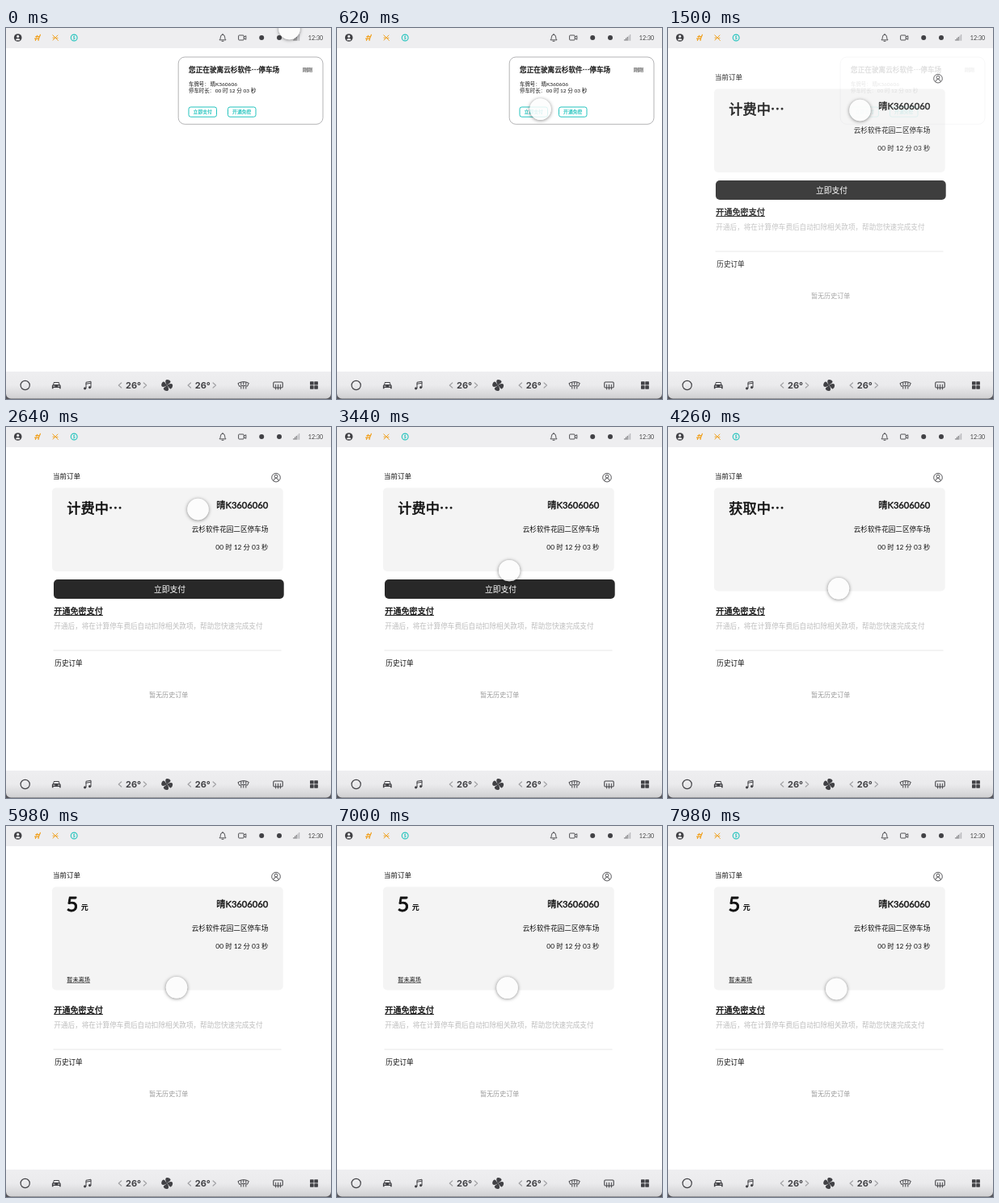
These frames come from a looping animation (402 px wide and 460 px high, 8 s). An HTML page with a canvas:

```html
<!DOCTYPE html>
<html lang="zh-CN">
<head>
<meta charset="utf-8">
<title>Parking payment</title>
<style>
html, body { margin: 0; width: 100%; height: 100%; overflow: hidden; background: #fff; }
canvas { display: block; width: 402px; height: 460px; }
</style>
</head>
<body>
<canvas id="stage"></canvas>
<script>
const W = 402, H = 460, LOOP = 8000;
const INK = '#414145', ORANGE = '#f0a01e', TEAL = '#22c3bd', BAR = '#eeeef0';
const SANS = 'Lato, "Noto Sans CJK SC", "Noto Sans CJK", sans-serif';
const PLATE = '晴K3606060', SHORT_PLATE = '晴K360606';
const PLACE = '云杉软件花园二区停车场', SHORT_PLACE = '云杉软件⋯停车场';
const DURATION = '00 时 12 分 03 秒';

const canvas = document.getElementById('stage');
const ctx = canvas.getContext('2d');
const ratio = window.devicePixelRatio || 1;
canvas.width = W * ratio;
canvas.height = H * ratio;

const mix = (a, b, u) => a + (b - a) * u;
const progress = (t, start, end) => Math.min(1, Math.max(0, (t - start) / (end - start)));
const easeOut = (u, power) => 1 - (1 - u) ** power;
const easeInOut = u => (1 - Math.cos(Math.PI * u)) / 2;

// y is the vertical middle of the glyphs; medium thickens the regular weight
function text(str, x, y, size, { color = '#111', weight = 400, medium = false, align = 'left', font = SANS } = {}) {
  ctx.font = `${weight} ${size}px ${font}`;
  ctx.textAlign = align;
  ctx.fillStyle = ctx.strokeStyle = color;
  ctx.fillText(str, x, y + size * 0.37);
  if (medium) {
    ctx.lineWidth = size * 0.035;
    ctx.strokeText(str, x, y + size * 0.37);
  }
}

function paint(fill, stroke, width = 1) {
  if (fill) { ctx.fillStyle = fill; ctx.fill(); }
  if (stroke) { ctx.strokeStyle = stroke; ctx.lineWidth = width; ctx.stroke(); }
}

function box(x, y, w, h, r, fill, stroke, width) {
  ctx.beginPath();
  ctx.roundRect(x, y, w, h, r);
  paint(fill, stroke, width);
}

function disc(x, y, r, fill, stroke, width) {
  ctx.beginPath();
  ctx.arc(x, y, r, 0, 7);
  paint(fill, stroke, width);
}

function shape(path, x, y, fill, stroke, width) {
  ctx.save();
  ctx.translate(x, y);
  const p = new Path2D(path);
  ctx.lineCap = ctx.lineJoin = 'round';
  if (fill) { ctx.fillStyle = fill; ctx.fill(p); }
  if (stroke) { ctx.strokeStyle = stroke; ctx.lineWidth = width || 1; ctx.stroke(p); }
  ctx.restore();
}

function statusBar() {
  box(0, 0, W, 25, 0, BAR);
  disc(14.7, 12, 4.8, INK);
  disc(14.7, 10.4, 1.6, BAR);
  shape('M-2.8 3.2Q-2.6 .9 0 .9Q2.6 .9 2.8 3.2Z', 14.7, 12, BAR);

  shape('M-3.4 1.2H1.4L3.4 -3.6M-2.2 -1.4H1.6M-2.6 3.5L-1.8 1.2M1 3.5L1.6 1.2M-.4 -2.6L-1.2 -.6', 39, 12, null, ORANGE, 1.2);
  shape('M-3.2 -3.2L3.4 3.4M-3 3L-.6 .8M.6 -.6L3 -3M-3 .2H-1.2M1.6 .4H3', 61, 12, null, ORANGE, 1);
  disc(84.2, 12, 3.9, null, TEAL, 1.1);
  text('$', 84.2, 12, 5.6, { color: TEAL, weight: 700, align: 'center' });

  shape('M-3.7 2.6Q-2.6 1.7 -2.6 -.8Q-2.5 -3.6 0 -3.8Q2.5 -3.6 2.6 -.8Q2.6 1.7 3.7 2.6ZM-1 4.3H1M0 -4.7V-4', 268, 12, null, INK, 0.9);
  box(287.6, 9, 6.6, 6, 1, null, INK, 0.9);
  shape('M2.4 -.9L4.8 -2.3V2.3L2.4 .9', 292, 12, null, INK, 0.9);
  disc(316.2, 12, 3, INK);
  disc(338, 12, 3, INK);
  for (let i = 0; i < 5; i++) {
    const h = 1.8 + i * 1.5;
    box(355.3 + i * 1.7, 15.8 - h, 1.1, h, 0, i < 3 ? '#77777a' : '#b4b4b7');
  }
  text('12:30', 373.8, 12.7, 7.2, { color: '#444' });
}

function climate(x) {
  shape('M1.7 -3L-1.7 0L1.7 3', x, 443, null, '#a2a2a5', 1.2);
  text('26°', x + 7, 442.8, 11, { color: INK, weight: 700, font: 'Inter, sans-serif' });
  shape('M-1.7 -3L1.7 0L-1.7 3', x + 31, 443, null, '#a2a2a5', 1.2);
}

function fan(x, y) {
  for (let i = 0; i < 4; i++) {
    ctx.save();
    ctx.translate(x, y);
    ctx.rotate(i * Math.PI / 2 + 0.35);
    shape('M0 0C-2.6 -1.8 -4.6 -4.2 -3.2 -6C-1.6 -7.4 2 -7.2 2.7 -5.4C3.1 -3.8 .9 -2.6 0 0Z', 0, 0, INK);
    ctx.restore();
  }
  disc(x, y, 1.5, INK);
  disc(x, y, 0.6, BAR);
}

function bottomBar() {
  const shade = ctx.createLinearGradient(0, 426, 0, 460);
  shade.addColorStop(0, BAR);
  shade.addColorStop(0.5, '#ebebed');
  shade.addColorStop(1, '#cfcfd1');
  box(0, 426, W, 34, 0, '#55555a');
  box(0, 426, W, 33.5, [0, 0, 6, 6], shade);
  disc(23.7, 443, 5.6, null, INK, 1.2);

  shape('M-5.4 4.2V.2L-4.2 -1L-3.2 -4H3.2L4.2 -1L5.4 .2V4.2H3.8V3H-3.8V4.2Z', 62.3, 443, INK);
  shape('M-2.6 -3H2.6L3.2 -.9H-3.2Z', 62.3, 443, BAR);
  shape('M-3.7 1.1H-2.2M2.2 1.1H3.7', 62.3, 443, null, BAR, 1);
  shape('M-2 3.5V-3.7L4 -4.8V2.3M-2 -1.7L4 -2.8', 101, 443, null, INK, 1);
  disc(97.6, 446.8, 1.6, INK);
  disc(103.6, 445.6, 1.6, INK);

  climate(141);
  fan(199.2, 443);
  climate(226.8);

  shape('M-6.5 -2.2Q0 -5.8 6.5 -2.2L4.8 1.6Q0 -.3 -4.8 1.6ZM-3 -3V-.2M0 -3.6V-.8M3 -3V-.2M-3 2.4V4.5M0 1.5V4.5M3 2.4V4.5', 293.8, 442.6, null, INK, 1);
  box(330.8, 439, 11.4, 7, 1.2, null, INK, 1.1);
  shape('M-2.8 -.8V5M0 -.8V5M2.8 -.8V5', 336.5, 443, null, INK, 1);
  for (const dx of [0, 5.3]) for (const dy of [0, 5.1]) box(376 + dx, 438.2 + dy, 4.6, 4.4, 0.6, INK);
}

function outlineButton(label, x) {
  box(x, 98, 34.5, 12.2, 2.5, null, TEAL, 1);
  text(label, x + 17.2, 104, 5.8, { color: TEAL, medium: true, align: 'center' });
}

function notification() {
  box(213.2, 36, 178.8, 83.3, 8, null, '#b4b4b6', 1);
  text('您正在驶离' + SHORT_PLACE, 226, 52, 8.65, { medium: true });
  text('刚刚', 367, 52, 6);
  text('车牌号：', 226, 69.3, 6.4);
  text(SHORT_PLATE, 252.5, 69.3, 6.5);
  text('停车时长：', 226, 78, 6.4);
  text(DURATION, 258.7, 78, 6.5);
  outlineButton('立即支付', 226);
  outlineButton('开通免密', 274.5);
}

function orderPage(state) {
  const billing = state === 'billing';
  text('当前订单', 58, 61.3, 8.5);
  disc(334, 62.7, 5.3, null, INK, 0.9);
  disc(334, 61.2, 1.9, null, INK, 0.9);
  shape('M-3.2 3.8Q-2.8 .8 0 .8Q2.8 .8 3.2 3.8', 334, 62.7, null, INK, 0.9);

  box(57, 75.5, 285.7, billing ? 103.5 : 128, 5, '#f4f4f4');
  text(PLATE, 324.3, 96.7, 11.2, { medium: true, align: 'right' });
  text(PLACE, 324.3, 127, 8.6, { align: 'right' });
  text(DURATION, 324.3, 149, 8.4, { align: 'right' });

  if (state === 'paid') {
    text('5', 74.6, 96.4, 25.5, { medium: true });
    text('元', 92.7, 101, 9, { weight: 700 });
    text('暂未离场', 75.3, 190, 7.2);
    box(75.3, 194, 28.8, 0.6, 0, '#222');
  } else {
    text(billing ? '计费中⋯' : '获取中⋯', 75.3, 100.3, 17.2, { medium: true });
  }
  if (billing) {
    box(59, 189, 284.7, 24, 5, '#282828');
    text('立即支付', 202.5, 201.2, 9.8, { color: '#fff', align: 'center' });
  }

  text('开通免密支付', 59.3, 228, 10.1, { medium: true });
  box(59.3, 233, 60.6, 1, 0, '#222');
  text('开通后，将在计算停车费后自动扣除相关款项，帮助您快速完成支付', 59.3, 247, 8.62, { color: '#bdbdbd' });
  box(58.5, 276.5, 282, 1, 0, '#e8e8e8');
  text('历史订单', 60.3, 293, 8.6);
  text('暂无历史订单', 177, 331.7, 8.05, { color: '#9a9a9a' });
}

function pointerAt(t) {
  if (t < 3220) {
    const u = progress(t, 20, 800);
    return [mix(350.5, 237.5, easeInOut(u)), mix(1, 102, easeOut(u, 3))];
  }
  const u = progress(t, 3220, 4020);
  const drift = easeInOut(progress(t, 6800, 7600));
  return [mix(237.5, 211, easeOut(u, 7.8)) - 2.7 * drift, mix(102, 200.3, easeOut(u, 4.6)) + 1.7 * drift];
}

function pointer(t) {
  const [x, y] = pointerAt(t), r = 13.2;
  ctx.save();
  // keep the shadow outside the translucent disc
  ctx.beginPath();
  ctx.rect(0, 0, W, H);
  ctx.arc(x, y, r, 0, 7);
  ctx.clip('evenodd');
  ctx.shadowColor = 'rgba(0,0,0,.5)';
  ctx.shadowBlur = 4 * ratio;
  ctx.shadowOffsetY = 0.6 * ratio;
  disc(x, y, r, '#fff');
  ctx.restore();
  disc(x, y, r, 'rgba(253,253,253,.85)');
}

function render(t) {
  ctx.setTransform(ratio, 0, 0, ratio, 0, 0);
  ctx.lineJoin = 'round';
  box(0, 0, W, H, 0, '#fff');
  const reveal = easeOut(progress(t, 1180, 1780), 3);
  if (reveal > 0) orderPage(t < 4140 ? 'billing' : t < 5590 ? 'fetching' : 'paid');
  if (reveal < 1) {
    ctx.globalAlpha = 1 - reveal;
    box(0, 0, W, H, 0, '#fff');
    notification();
    ctx.globalAlpha = 1;
  }
  statusBar();
  bottomBar();
  pointer(t);
}

const begin = performance.now();
function tick() {
  render((performance.now() - begin) % LOOP);
  requestAnimationFrame(tick);
}
tick();
</script>
</body>
</html>
```
